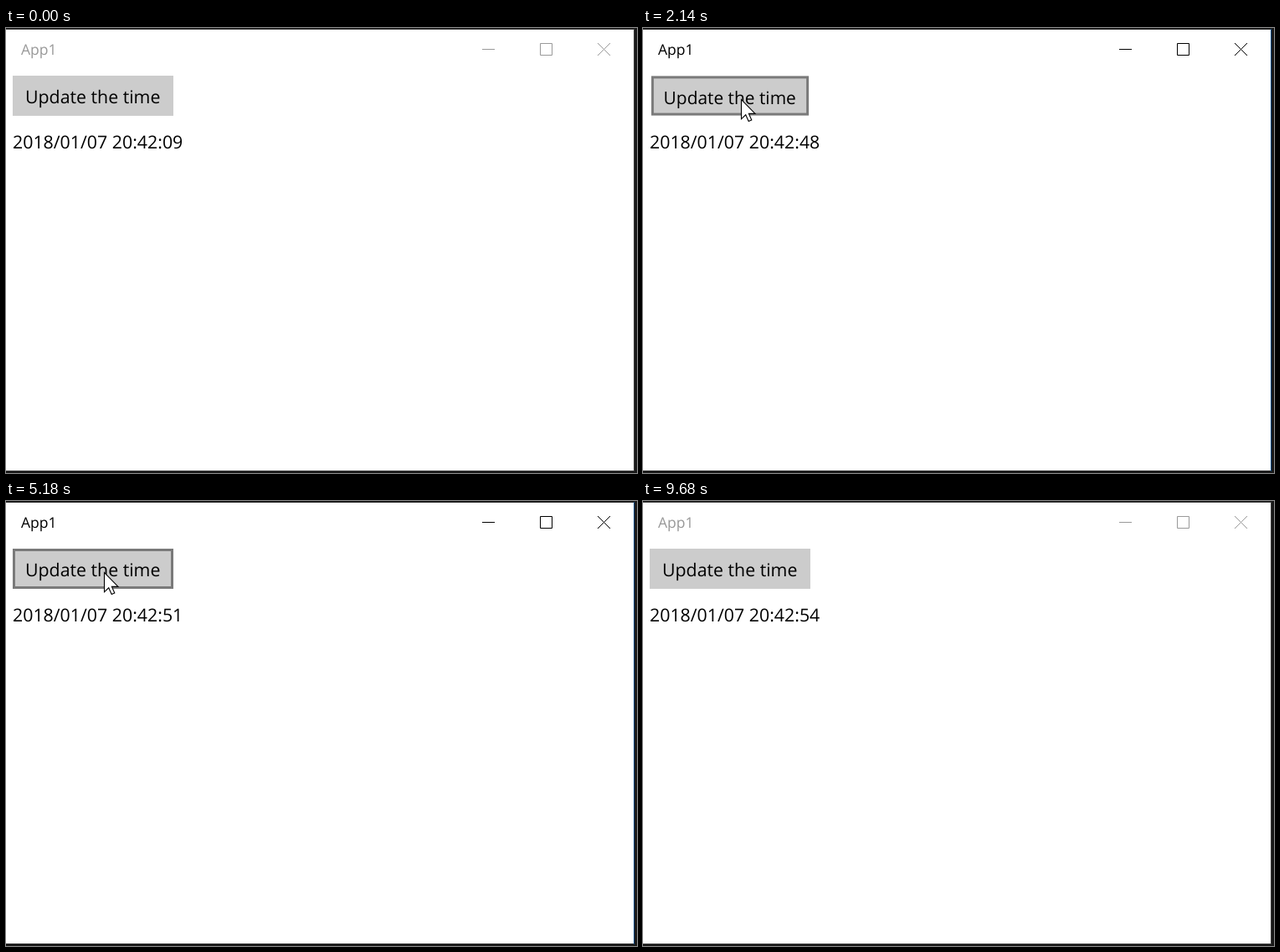
Recreate the animation shown at these times as an HTML page. Size 754x532 px, loop 9830 ms.

```html
<!DOCTYPE html>
<html lang="en">
<head>
<meta charset="utf-8">
<title>Update the time</title>
<style>
  html, body { margin: 0; width: 100%; height: 100%; overflow: hidden; background: #181818; }
  svg { display: block; width: 754px; height: 532px; }
  text {
    font: 21.33px "Open Sans", "Noto Sans", sans-serif;
    text-rendering: geometricPrecision;
    white-space: pre;
  }
  #title { font-size: 17.5px; }
  #icons { fill: none; stroke-width: 1; }
</style>
</head>
<body>
<svg viewBox="0 0 754 532">
  <rect width="754" height="532" fill="#181818"/>
  <rect id="edge" y="1" width="751" height="529"/>
  <rect id="side" x="750" y="1" width="1" height="529"/>
  <rect y="2" width="750" height="527" fill="#fff"/>
  <text id="title" x="18" y="32">App1</text>
  <g id="icons">
    <path d="M569 25.5H584M638.5 18.5H652.5V32.5H638.5Z"/>
    <path d="M707 18L722 33M722 18L707 33"/>
  </g>
  <g id="button">
    <rect id="face" x="8" y="57" width="192" height="48"/>
    <rect id="ring" x="9.5" y="58.5" width="189" height="45" fill="none" stroke="#7a7a7a" stroke-width="3"/>
    <text id="label" x="23" y="90">Update the time</text>
  </g>
  <text id="date" x="8" y="144"></text>
  <path id="cursor" d="M.5 .5V23.8L5.7 18.8L9.2 26.6L12.8 25L9.4 17.4H17Z" fill="#fff" stroke="#000" stroke-width="1.1"/>
</svg>
<script>
const LOOP = 9830;
const $ = id => document.getElementById(id);
const set = (id, attrs) => {
  for (const key in attrs) $(id).setAttribute(key, attrs[key]);
};

const ENTRY = [502, 449], REST = [418, 405], TARGET = [117, 85], EXIT = [727, 515];
const easeInOut = p => (1 - Math.cos(Math.PI * p)) / 2;
const easeIn = p => Math.pow(p, 1.4);
const mix = (a, b, p) => a.map((v, i) => Math.round(v + (b[i] - v) * p));

// Number of evenly spaced steps already taken between two times.
function steps(t, from, to, count) {
  if (t < from) return 0;
  return Math.min(count, 1 + Math.floor((t - from) / (to - from) * (count - 1) + 1e-6));
}

// Press, release, start and end of the spring back, number of steps.
const CLICKS = [
  [1920, 2140, 2300, 2450, 3, "42:48"],
  [4640, 4860, 5030, 5180, 3, "42:51"],
  [7900, 8130, 8280, 8520, 4, "42:54"]
];

function cursorAt(t) {
  if (t < 500 || t >= 9280) return null;
  if (t < 900) return mix(ENTRY, REST, (steps(t, 500, 650, 3) - 1) / 2);
  if (t < 8670) return mix(REST, TARGET, easeInOut(steps(t, 900, 1600, 10) / 10));
  return mix(TARGET, EXIT, easeIn(steps(t, 8670, 9204, 8) / 8));
}

function buttonAt(t) {
  let time = "42:09", down = 0, pressed = false;
  for (const [press, release, start, end, count, stamp] of CLICKS) {
    if (t < press) break;
    pressed = t < release;
    down = 1 - steps(t, start, end, count) / count;
    if (!pressed) time = stamp;
  }
  return { time, down, pressed };
}

function draw(t) {
  const active = t >= 1920 && t < 9680;
  const ink = active ? "#000" : "#999";
  set("edge", { fill: active ? "#2b2b2b" : "#434343" });
  set("side", { fill: active ? "#0b4a83" : "#434343" });
  set("title", { fill: ink });
  set("icons", { stroke: ink });

  const pos = cursorAt(t);
  set("cursor", {
    visibility: pos ? "visible" : "hidden",
    transform: `translate(${pos || [0, 0]})`
  });

  const { time, down, pressed } = buttonAt(t);
  const hover = pos && pos[0] >= 8 && pos[0] < 200 && pos[1] >= 57 && pos[1] < 105;
  set("face", { fill: pressed ? "#999" : "#ccc" });
  set("ring", { visibility: hover && !pressed ? "visible" : "hidden" });
  set("label", { y: 90 + 0.8 * down, fill: pressed ? "#111" : "#000" });
  set("button", { transform: `translate(104 81) scale(${1 - 0.02 * down}) translate(-104 -81)` });

  const stamp = "2018/01/07 20:" + time;
  if ($("date").textContent !== stamp) $("date").textContent = stamp;
}

const begin = performance.now();
function tick() {
  draw((performance.now() - begin) % LOOP);
  requestAnimationFrame(tick);
}
draw(0);
requestAnimationFrame(tick);
</script>
</body>
</html>
```
